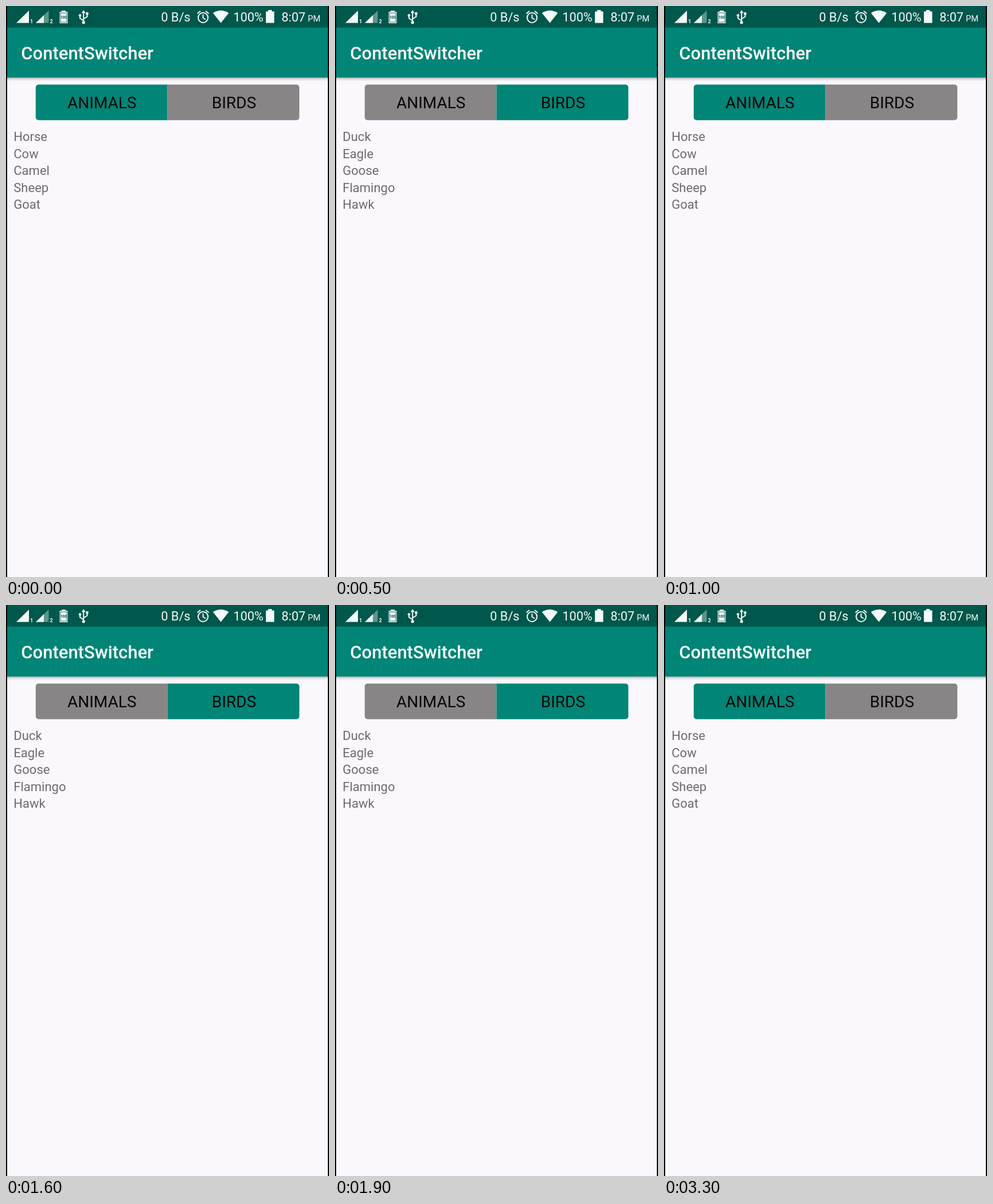
Write an HTML page that moves like this. It is 563 px wide and 994 px high and loops after 4100 ms.

```html
<!DOCTYPE html>
<html lang="en">
<head>
<meta charset="utf-8">
<title>Content switcher</title>
<style>
  html, body { margin: 0; width: 100%; height: 100%; overflow: hidden; background: #000; }
  svg { display: block; width: 100%; height: 100%; font-family: Roboto, sans-serif; }
  .status { font-size: 21.7px; fill: #f4faf9; }
  .tiny { font-size: 9px; font-weight: 700; }
  .title { font-size: 31px; font-weight: 500; fill: #fff; }
  .tab { font-size: 28px; text-anchor: middle; fill: #060606; }
  .item { font-size: 22px; fill: #6d6b6f; }
  .line { fill: none; stroke: #f4faf9; stroke-width: 2; }
</style>
</head>
<body>
<svg viewBox="0 0 563 994">
  <defs>
    <linearGradient id="shade" x2="0" y2="1">
      <stop offset="0" stop-color="#000" stop-opacity=".34"/>
      <stop offset=".4" stop-color="#000" stop-opacity=".13"/>
      <stop offset="1" stop-color="#000" stop-opacity="0"/>
    </linearGradient>
  </defs>

  <rect width="563" height="994"/>
  <rect x="2" width="559" height="994" fill="#faf8fc"/>
  <rect x="2" y="124" width="559" height="7" fill="url(#shade)"/>
  <rect x="2" y="37" width="559" height="87.5" fill="#008577"/>
  <rect x="2" width="559" height="37.5" fill="#00574b"/>

  <g class="status">
    <!-- signal strength -->
    <path d="M18 29.5L40 8V29.5Z"/>
    <text class="tiny" x="42" y="30">1</text>
    <path d="M52 29.5L74.5 8V29.5Z" opacity=".38"/>
    <path d="M52 29.5L66 16V29.5Z"/>
    <text class="tiny" x="76.5" y="30">2</text>

    <!-- battery level -->
    <path d="M97 8h7v2h3.5v20h-14V10H97Z"/>
    <rect x="95" y="12" width="11" height="16" fill="none" stroke="#00574b" stroke-width=".8"/>
    <text x="100.5" y="21.6" text-anchor="middle" font-size="6.5" font-weight="700" fill="#00574b">100</text>

    <!-- cable -->
    <path class="line" d="M135.2 11V28M135.2 25.5L129 21.5V17M135.2 22.5L141.5 18.5V14"/>
    <path d="M135.2 7l3.4 5.2h-6.8Z"/>
    <circle cx="135.2" cy="28.7" r="2.6"/>
    <circle cx="129" cy="16.2" r="2.3"/>
    <rect x="139.3" y="11" width="4.2" height="4.4"/>

    <!-- alarm -->
    <circle class="line" cx="343.5" cy="20.3" r="8.6"/>
    <path class="line" d="M343.5 14.8V20.8L348 23.5M333.6 13.2L339 8.7M353.4 13.2L348 8.7"/>

    <!-- wireless -->
    <path d="M374.5 29.5L360.8 12.3Q374.5 3.2 388.2 12.3Z"/>

    <!-- battery -->
    <path d="M457 7h6.5v2.5H467.500V29.500H453V9.500H457Z"/>

    <text x="270.3" y="27.3">0 B/s</text>
    <text x="396.3" y="27.3">100%</text>
    <text x="480.2" y="27.3">8:07</text>
    <text x="526" y="27.3" font-size="14.7">PM</text>
  </g>

  <text class="title" x="26.3" y="92.6">ContentSwitcher</text>

  <path id="left" d="M281.500 136.700H56.800a5 5 0 0 0-5 5V193.700a5 5 0 0 0 5 5H281.500Z"/>
  <path id="right" d="M281.500 136.700H506.300a5 5 0 0 1 5 5V193.700a5 5 0 0 1-5 5H281.500Z"/>
  <text class="tab" x="167.200" y="178.400">ANIMALS</text>
  <text class="tab" x="397.400" y="178.400">BIRDS</text>

  <g id="list"></g>
</svg>
<script>
  const LOOP = 4100;
  const ON = '#008577', OFF = '#888587';
  const tabs = [
    ['Horse', 'Cow', 'Camel', 'Sheep', 'Goat'],
    ['Duck', 'Eagle', 'Goose', 'Flamingo', 'Hawk']
  ];
  const birdSpans = [[500, 1000], [1600, 2100]];
  const byId = id => document.getElementById(id);
  const buttons = [byId('left'), byId('right')];

  const rows = tabs[0].map((_, i) => {
    const row = document.createElementNS('http://www.w3.org/2000/svg', 'text');
    row.setAttribute('class', 'item');
    row.setAttribute('x', 13.3);
    row.setAttribute('y', 235 + 29.5 * i);
    return byId('list').appendChild(row);
  });

  let shown = -1;
  function draw(time) {
    const active = birdSpans.some(([from, to]) => time >= from && time < to) ? 1 : 0;
    if (active === shown) return;
    shown = active;
    buttons.forEach((button, i) => button.setAttribute('fill', i === active ? ON : OFF));
    rows.forEach((row, i) => { row.textContent = tabs[active][i]; });
  }

  const start = performance.now();
  function tick() {
    draw((performance.now() - start) % LOOP);
    requestAnimationFrame(tick);
  }
  tick();
</script>
</body>
</html>
```
